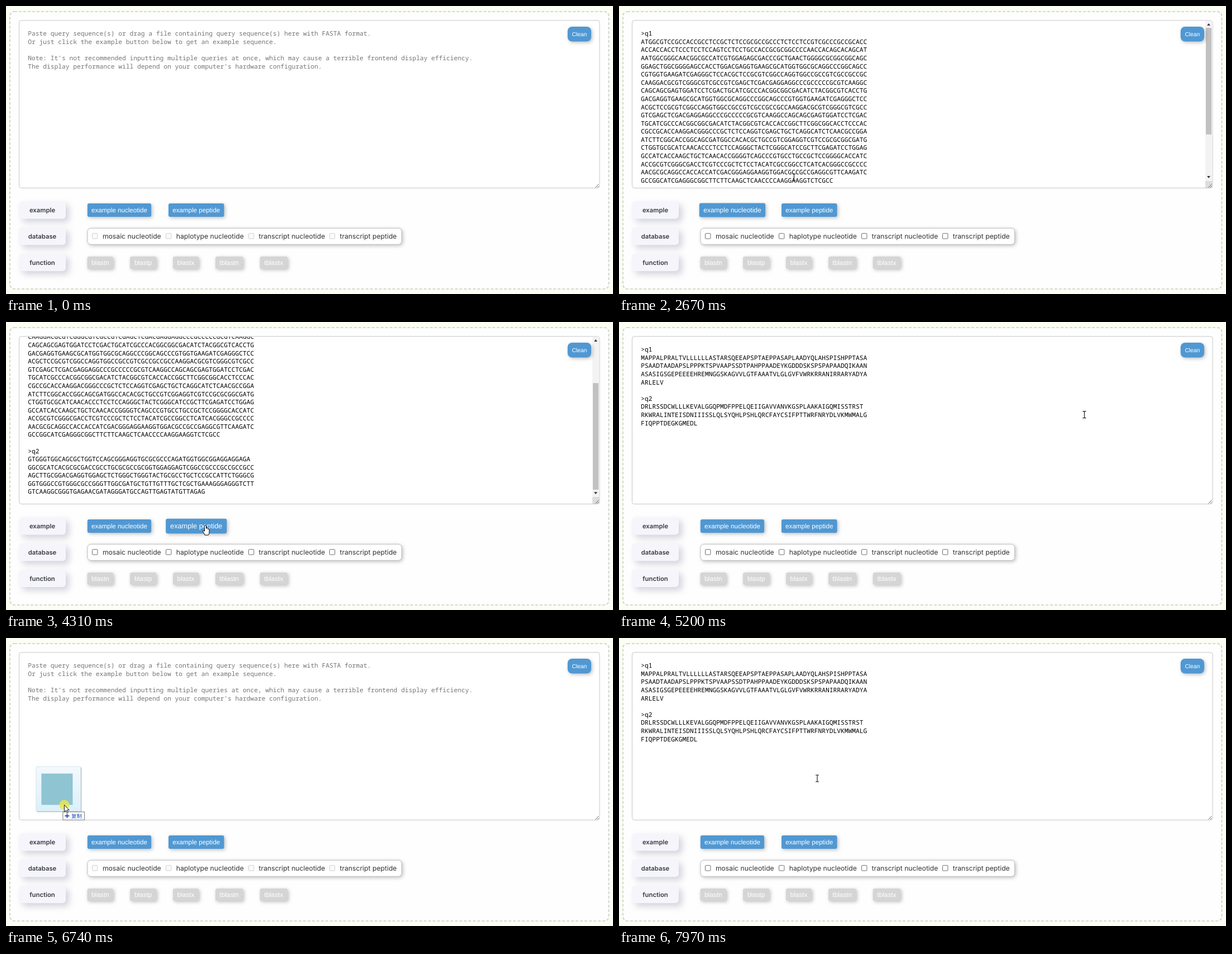
An HTML page that plays this animation: 1087 by 515 pixels, repeating every 8000 ms.

```html
<!DOCTYPE html>
<html lang="en">
<head>
<meta charset="utf-8">
<title>Sequence query form</title>
<style>
  html, body { margin: 0; width: 100%; height: 100%; overflow: hidden; background: #fbfef2; }
  svg { display: block; width: 100%; height: 100%; }
  text { text-rendering: geometricPrecision; }
  .mono { font: 11.25px "Noto Sans Mono", "DejaVu Sans Mono", monospace; white-space: pre; }
  .hint { fill: #757575; }
  .arial { font-family: "Liberation Sans", Arial, sans-serif; text-anchor: middle; }
  .title { font: 600 11.3px Inter, sans-serif; text-anchor: middle; fill: #3a3a44; }
  .choice { font: 12.2px Inter, sans-serif; text-anchor: middle; fill: #333; }
  .tag { fill: #f5f5fb; filter: drop-shadow(6px 6px 6px rgba(120, 120, 155, .32)); }
  .button { filter: drop-shadow(2px 2px 3px rgba(0, 0, 0, .25)); }
  .list { filter: drop-shadow(2px 2px 3px rgba(0, 0, 0, .24)); }
</style>
</head>
<body>
<svg id="stage" viewBox="0 0 1087 515" xmlns="http://www.w3.org/2000/svg">
  <defs>
    <clipPath id="view"><rect x="24" y="26.5" width="1025" height="298.5"/></clipPath>
    <linearGradient id="sky" x1="0" y1="0" x2="0" y2="1">
      <stop offset="0" stop-color="#f3f9fd"/><stop offset="1" stop-color="#dcf0fa"/>
    </linearGradient>
  </defs>
  <rect width="1087" height="515" fill="#fbfef2"/>
  <rect x="7" y="10" width="1072.5" height="496" rx="8" fill="#fefefe" stroke="#c9ccc9" stroke-width="1.6" stroke-dasharray="5 3"/>
  <rect id="area" x="23.5" y="25.8" width="1039.5" height="299.7" rx="4" fill="#fff" stroke="#c6c6c6"/>
  <g clip-path="url(#view)"><g id="texts"></g></g>
  <g id="bar">
    <rect x="1050" y="26.5" width="12.5" height="286.5" fill="#f3f3f3"/>
    <rect x="1050" y="313" width="12.5" height="12" fill="#dcdcdc"/>
    <path d="M1053 35l3-4 3 4zM1053 304l3 4 3-4z" fill="#4a2a4a"/>
    <rect id="thumb" x="1051" width="10" height="190.5" fill="#c1c1c1"/>
  </g>
  <path d="M1055.5 324.5l6-6M1059 324.5l2.5-2.5" stroke="#666" fill="none"/>
  <g id="form"></g>
  <g id="pointer">
    <g id="drag">
      <rect x="-50.5" y="-68.5" width="80" height="80" rx="2" fill="url(#sky)" stroke="#d3e2ea"/>
      <path d="M30.3-67V12.3H-49" fill="none" stroke="#b4bcc0" stroke-width="1.2"/>
      <rect x="-41" y="-56" width="56" height="56" fill="#8fc4d2"/>
    </g>
    <circle id="press" r="9" fill="#e9e74f" fill-opacity=".85"/>
    <g id="copy">
      <rect x="-2.5" y="12.5" width="38.5" height="14.5" fill="#fff" stroke="#777"/>
      <path d="M1 19.7h8M5 15.7v8" stroke="#1a44a8" stroke-width="1.6"/>
      <text x="12.6" y="23.2" font-size="9.5" font-family="'Noto Sans CJK SC', 'Noto Sans CJK', sans-serif" fill="#1c4bc0">复制</text>
    </g>
    <path id="arrow" d="M0 0V12.6L2.9 10L4.9 14.3L6.8 13.4L4.9 9.2H8.8Z" fill="#fff" stroke="#000" stroke-width=".9"/>
    <path id="hand" d="M-1.5 1Q-1.5-.5 0-.5T1.5 1V5.5Q4-.5 4.3 6.4Q6.9 5 7 8V12Q7 14.5 5.5 17H-1Q-2 14-4.6 10.6Q-4.8 8.2-1.5 10Z" fill="#fff" stroke="#000"/>
    <path id="beam" d="M-3-6H-1Q0-6 0-5Q0-6 1-6H3M0-5V5M-3 6H-1Q0 6 0 5Q0 6 1 6H3" fill="none" stroke="#111" stroke-width="1.1"/>
  </g>
</svg>
<script>
const LOOP = 8000, LINE = 14.58, MAX_SCROLL = 110.3;
const $ = id => document.getElementById(id);

function add(parent, tag, attrs, label) {
  const node = document.createElementNS("http://www.w3.org/2000/svg", tag);
  for (const key in attrs) node.setAttribute(key, attrs[key]);
  if (label) node.textContent = label;
  return parent.appendChild(node);
}

const hint = `Paste query sequence(s) or drag a file containing query sequence(s) here with FASTA format.
Or just click the example button below to get an example sequence.

Note: It's not recommended inputting multiple queries at once, which may cause a terrible frontend display efficiency.
The display performance will depend on your computer's hardware configuration.`;

const nucleotide = `>q1
ATGGCGTCCGCCACCGCCTCCGCTCTCCGCGCCGCCCTCTCCTCCGTCGCCCGCCGCACC
ACCACCACCTCCCTCCTCCAGTCCTCCTGCCACCGCGCGGCCCCAACCACAGCACAGCAT
AATGGCGGGCAACGGCGCCATCGTGGAGAGCGACCCGCTGAACTGGGGCGCGGCGGCAGC
GGAGCTGGCGGGGAGCCACCTGGACGAGGTGAAGCGCATGGTGGCGCAGGCCCGGCAGCC
CGTGGTGAAGATCGAGGGCTCCACGCTCCGCGTCGGCCAGGTGGCCGCCGTCGCCGCCGC
CAAGGACGCGTCGGGCGTCGCCGTCGAGCTCGACGAGGAGGCCCGCCCCCGCGTCAAGGC
CAGCAGCGAGTGGATCCTCGACTGCATCGCCCACGGCGGCGACATCTACGGCGTCACCTG
GACGAGGTGAAGCGCATGGTGGCGCAGGCCCGGCAGCCCGTGGTGAAGATCGAGGGCTCC
ACGCTCCGCGTCGGCCAGGTGGCCGCCGTCGCCGCCGCCAAGGACGCGTCGGGCGTCGCC
GTCGAGCTCGACGAGGAGGCCCGCCCCCGCGTCAAGGCCAGCAGCGAGTGGATCCTCGAC
TGCATCGCCCACGGCGGCGACATCTACGGCGTCACCACCGGCTTCGGCGGCACCTCCCAC
CGCCGCACCAAGGACGGGCCCGCTCTCCAGGTCGAGCTGCTCAGGCATCTCAACGCCGGA
ATCTTCGGCACCGGCAGCGATGGCCACACGCTGCCGTCGGAGGTCGTCCGCGCGGCGATG
CTGGTGCGCATCAACACCCTCCTCCAGGGCTACTCGGGCATCCGCTTCGAGATCCTGGAG
GCCATCACCAAGCTGCTCAACACCGGGGTCAGCCCGTGCCTGCCGCTCCGGGGCACCATC
ACCGCGTCGGGCGACCTCGTCCCGCTCTCCTACATCGCCGGCCTCATCACGGGCCGCCCC
AACGCGCAGGCCACCACCATCGACGGGAGGAAGGTGGACGCCGCCGAGGCGTTCAAGATC
GCCGGCATCGAGGGCGGCTTCTTCAAGCTCAACCCCAAGGAAGGTCTCGCC

>q2
GTGGGTGGCAGCGCTGGTCCAGCGGGAGGTGCGCGCCCAGATGGTGGCGGAGGAGGAGA
GGCGCATCACGCGCGACCGCCTGCGCGCCGCGGTGGAGGAGTCGGCCGCCCGCCGCCGCC
AGCTTGCGGACGAGGTGGAGCTCTGGGCTGGGTACTGCGCCTGCTCCGCCATTCTGGGCG
GGTGGGCCGTGGGCGCCGGGTTGGCGATGCTGTTGTTTGCTCGCTGAAAGGGAGGGTCTT
GTCAAGGCGGGTGAGAACGATAGGGATGCCAGTTGAGTATGTTAGAG`;

const peptide = `>q1
MAPPALPRALTVLLLLLLASTARSQEEAPSPTAEPPASAPLAADYQLAHSPISHPPTASA
PSAADTAADAPSLPPPKTSPVAAPSSDTPAHPPAADEYKGDDDSKSPSPAPAADQIKAAN
ASASIGSGEPEEEEHREMNGGSKAGVVLGTFAAATVLGLGVFVWRKRRANIRRARYADYA
ARLELV

>q2
DRLRSSDCWLLLKEVALGGQPMDFPPELQEIIGAVVANVKGSPLAAKAIGQMISSTRST
RKWRALINTEISDNIIISSLQLSYQHLPSHLQRCFAYCSIFPTTWRFNRYDLVKMWMALG
FIQPPTDEGKGMEDL`;

function textBlock(content, cls) {
  const block = add($("texts"), "g", { class: cls });
  content.split("\n").forEach((line, i) => {
    if (line) add(block, "text", { x: 39.3, y: 53.3 + i * LINE }, line);
  });
  return block;
}
const blocks = {
  hint: textBlock(hint, "mono hint"),
  nucleotide: textBlock(nucleotide, "mono"),
  peptide: textBlock(peptide, "mono")
};

// Form controls
const form = $("form");
[["example", 365], ["database", 411.7], ["function", 458.5]].forEach(([name, y]) => {
  add(form, "rect", { class: "tag", x: 23, y: y - 16, width: 84, height: 31.5, rx: 6 });
  add(form, "text", { class: "title", x: 65, y: y + 4 }, name);
});

add(form, "rect", { class: "list", x: 146, y: 397.3, width: 562.5, height: 29, rx: 6, fill: "#fff", stroke: "#bdbdbd" });
const boxes = [
  ["mosaic nucleotide", 154, 225.3], ["haplotype nucleotide", 286, 365.3],
  ["transcript nucleotide", 434, 512], ["transcript peptide", 579, 648.7]
].map(([name, x, mid]) => {
  add(form, "text", { class: "choice", x: mid, y: 415.5 }, name);
  return add(form, "rect", { x: x + .5, y: 406.7, width: 9.4, height: 9.4, rx: 1, fill: "#fff" });
});

function button(label, x, y, w, h, size, rx, fill, ink) {
  const g = add(form, "g", { class: "button" });
  add(g, "rect", { x, y, width: w, height: h, rx, fill });
  add(g, "text", { class: "arial", x: x + w / 2, y: y + h / 2 + size * .35, "font-size": size, fill: ink }, label);
  return { g, x, y, w, h };
}
const blue = (label, x, y, w, h, size, rx) => button(label, x, y, w, h, size, rx, "#5098d3", "#fff");
const hot = [
  { ...blue("example nucleotide", 145.8, 353, 114.3, 24, 11.6, 3), enter: 1800, leave: 2510 },
  { ...blue("example peptide", 291, 353, 99.5, 24, 11.6, 3), enter: 3980, leave: 4860 },
  { ...blue("Clean", 1005.7, 37, 42.3, 26.5, 10.3, 8), enter: 5650, leave: 6060 }
];
[["blastn", 145.5, 46.5], ["blastp", 222, 47.3], ["blastx", 299, 46], ["tblastn", 375, 49.5], ["tblastx", 454.7, 49.5]]
  .forEach(([label, x, w]) => button(label, x, 448, w, 22, 11.8, 3, "#d5d5d5", "#fff"));

// Pointer route: time, x, y
const route = [
  [0, 1010, 530], [60, 944, 454], [250, 760, 315], [500, 400, 130], [750, 253.5, 79],
  [1360, 253.5, 79], [1600, 228, 225], [1800, 208, 353], [1890, 205, 357.5], [2050, 204, 359],
  [2460, 204, 359], [2600, 265, 328], [2850, 435, 252], [2990, 461.5, 238],
  [3140, 461.5, 238], [3250, 462, 242], [3540, 462, 242], [3600, 462.3, 243.5],
  [3750, 462.3, 243.5], [3980, 384, 355], [4150, 366, 364], [4310, 357, 364], [4450, 357, 361],
  [4820, 357, 361], [5000, 560, 270], [5200, 832.5, 166], [5400, 960, 96], [5610, 1004, 67],
  [5800, 1023, 52], [6040, 1023, 52], [6200, 700, 180], [6370, 60, 335],
  [6440, -40, 323], [6740, 104, 298.5], [7250, 291, 257], [7400, 361, 252], [7520, 355, 251], [8000, 355, 251]
];
const presses = [[910, 1110], [2110, 2210], [4520, 4670], [5900, 6000], [6485, 7820]];

const clamp = v => Math.min(1, Math.max(0, v));
const easeOut = u => 1 - (1 - clamp(u)) ** 2;
const smooth = u => (u = clamp(u), u * u * (3 - 2 * u));
const show = (node, on) => node.setAttribute("visibility", on ? "visible" : "hidden");

// Monotone cubic interpolation along one axis
function along(t, axis) {
  let i = 0;
  while (i < route.length - 2 && t >= route[i + 1][0]) i++;
  const slope = k => (route[k + 1][axis] - route[k][axis]) / (route[k + 1][0] - route[k][0]);
  const tangent = k => {
    if (k === 0) return slope(0);
    if (k === route.length - 1) return slope(k - 1);
    const a = slope(k - 1), b = slope(k);
    return a * b > 0 ? 2 * a * b / (a + b) : 0;
  };
  const [a, b] = [route[i], route[i + 1]], d = b[0] - a[0], u = (t - a[0]) / d, s = smooth(u);
  return a[axis] * (1 - s) + b[axis] * s
    + d * (tangent(i) * u * (1 - u) ** 2 - tangent(i + 1) * u * u * (1 - u));
}

function content(t) {
  if (t < 2210) return "hint";
  if (t < 4670) return "nucleotide";
  if (t < 6000) return "peptide";
  return t < 7870 ? "hint" : "peptide";
}

function cursorAt(x, y) {
  if (hot.some(b => x > b.x && x < b.x + b.w && y > b.y && y < b.y + b.h)) return "hand";
  return x > 23 && x < 1063 && y > 25 && y < 326 ? "beam" : "arrow";
}

function draw(t) {
  const current = content(t), focus = t >= 960 && t < 2110;
  for (const name in blocks) show(blocks[name], name === current);
  $("area").setAttribute("stroke", focus ? "#000" : "#c6c6c6");
  $("area").setAttribute("stroke-width", focus ? 1.8 : 1);

  const scroll = MAX_SCROLL * smooth((t - 3012) / 288);
  blocks.nucleotide.setAttribute("transform", `translate(0 ${-scroll})`);
  $("thumb").setAttribute("y", 39.2 + scroll * .635);
  show($("bar"), current === "nucleotide");

  for (const box of boxes) {
    box.setAttribute("stroke", current === "hint" ? "#cfcfcf" : "#6f6a78");
    box.setAttribute("fill", current === "hint" ? "#fafafa" : "#fff");
  }
  for (const b of hot) {
    const grow = 1 + .1 * (easeOut((t - b.enter) / 400) - easeOut((t - b.leave) / 400));
    const cx = b.x + b.w / 2, cy = b.y + b.h / 2;
    b.g.setAttribute("transform", `translate(${cx} ${cy}) scale(${grow}) translate(${-cx} ${-cy})`);
  }

  const x = along(t, 1), y = along(t, 2);
  const visible = t >= 45 && (t < 6380 || t >= 6485);
  const dragging = t >= 6485 && t < 7820;
  const kind = dragging ? "arrow" : cursorAt(x, y);
  $("pointer").setAttribute("transform", `translate(${x} ${y})`);
  $("press").setAttribute("cx", kind === "beam" ? -2 : 0);
  for (const name of ["arrow", "hand", "beam"]) show($(name), visible && kind === name);
  show($("press"), presses.some(([from, to]) => t >= from && t < to));
  show($("drag"), dragging);
  show($("copy"), dragging);
}

const start = performance.now();
function tick() {
  draw((performance.now() - start) % LOOP);
  requestAnimationFrame(tick);
}
tick();
</script>
</body>
</html>
```
